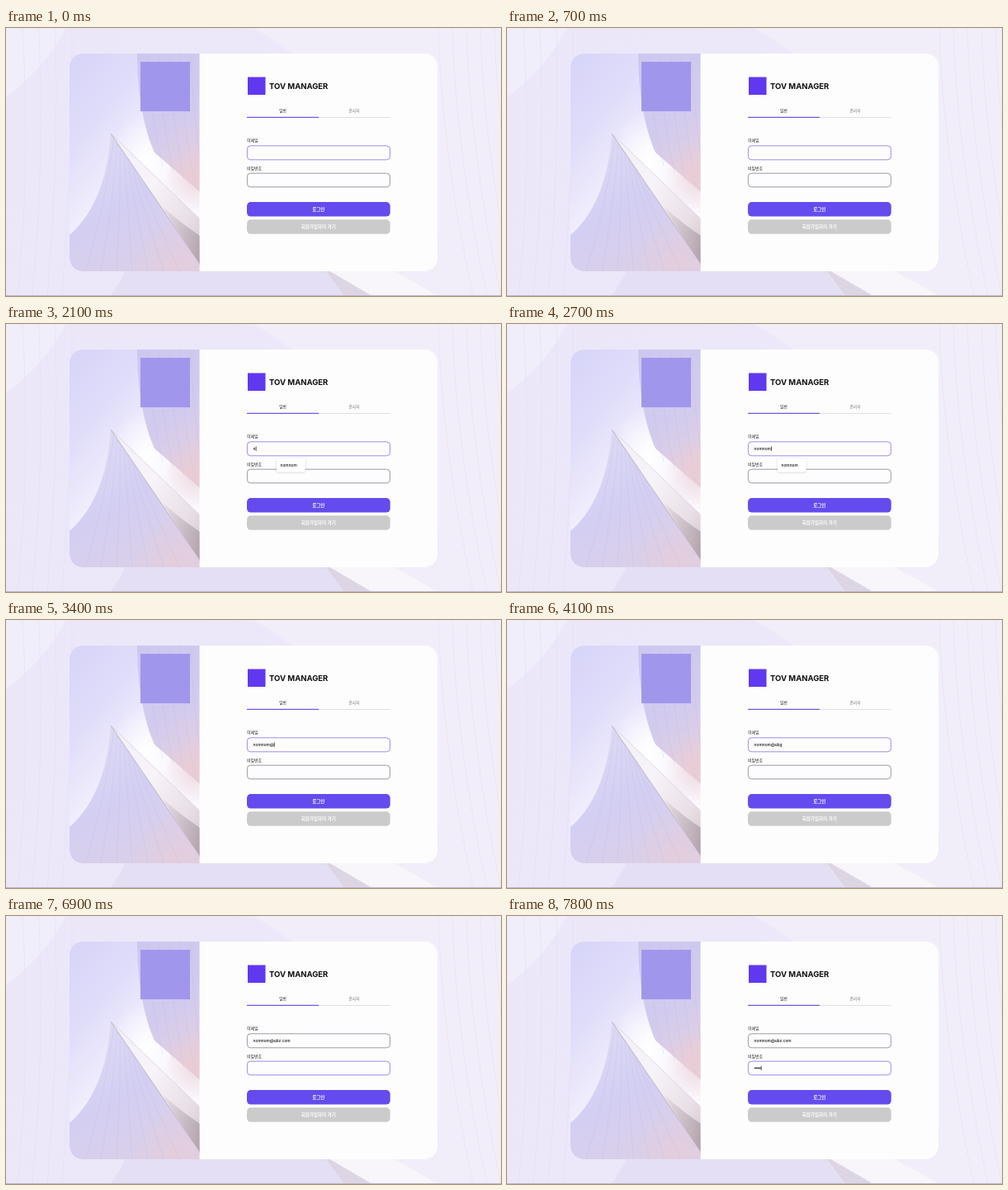
Recreate the animation shown at these times as an HTML page. Size 600 px wide and 325 px high, loop 8000 ms.

```html
<!DOCTYPE html>
<html lang="ko">
<head>
<meta charset="utf-8">
<title>로그인</title>
<style>
html, body { margin: 0; width: 100%; height: 100%; overflow: hidden; background: #efebf9; }
svg { display: block; width: 100vw; height: 100vh; }
text { font-family: Inter, "Noto Sans CJK KR", "Noto Sans CJK", sans-serif; fill: #222; }
.ko { font-family: "Noto Sans CJK KR", "Noto Sans CJK", sans-serif; font-size: 4.9px; }
.mid { text-anchor: middle; }
.btn { font-size: 5.5px; font-weight: 700; fill: #fff; }
.typed { font-size: 4.85px; font-weight: 500; fill: #111; }
.field { fill: #fdfdfe; stroke: #85818f; stroke-width: .8; }
.field.focus { stroke: #8270ea; }
.rib { fill: none; stroke-width: .5; }
</style>
</head>
<body>
<svg viewBox="0 0 600 325" preserveAspectRatio="none">
  <defs>
    <linearGradient id="page" x2="1" y2=".3">
      <stop offset="0" stop-color="#ebe7f9"/><stop offset=".5" stop-color="#ece8fa"/><stop offset="1" stop-color="#f1edf9"/>
    </linearGradient>
    <linearGradient id="sky" x2=".7" y2="1">
      <stop offset="0" stop-color="#d6d4f8"/><stop offset=".3" stop-color="#e0ddfa"/><stop offset=".6" stop-color="#f3f0fd"/><stop offset="1" stop-color="#fbf8fd"/>
    </linearGradient>
    <linearGradient id="wall" x2=".3" y2="1">
      <stop offset="0" stop-color="#cbc8f0"/><stop offset=".6" stop-color="#d2cbee"/><stop offset="1" stop-color="#e3cfdf"/>
    </linearGradient>
    <linearGradient id="sail" x1=".2" x2=".7" y2="1">
      <stop offset="0" stop-color="#dedbf5"/><stop offset=".5" stop-color="#d3cff3"/><stop offset="1" stop-color="#dccfe6"/>
    </linearGradient>
    <linearGradient id="ridge" x2="1" y2=".9">
      <stop offset="0" stop-color="#f2eff9"/><stop offset=".45" stop-color="#f7f3f8"/><stop offset=".8" stop-color="#e9dfe6"/><stop offset="1" stop-color="#d5c9d2"/>
    </linearGradient>
    <linearGradient id="shade" x2="1" y2="1">
      <stop offset="0" stop-color="#c9bfca" stop-opacity=".3"/><stop offset="1" stop-color="#a2969f"/>
    </linearGradient>
    <radialGradient id="glow">
      <stop offset="0" stop-color="#fff"/><stop offset="1" stop-color="#fff" stop-opacity="0"/>
    </radialGradient>
    <radialGradient id="blush">
      <stop offset="0" stop-color="#eccbd0" stop-opacity=".75"/><stop offset="1" stop-color="#eccbd0" stop-opacity="0"/>
    </radialGradient>
    <clipPath id="card"><rect x="77" y="31" width="446" height="264" rx="16"/></clipPath>
    <clipPath id="panel"><rect x="77" y="31" width="157.5" height="264"/></clipPath>
    <filter id="soft" x="-20%" y="-30%" width="140%" height="180%">
      <feDropShadow dx="0" dy=".6" stdDeviation="1" flood-color="#556" flood-opacity=".3"/>
    </filter>
  </defs>

  <rect width="600" height="325" fill="url(#page)"/>
  <path d="M0 0H72C58 30 30 62 0 84Z" fill="#f1eefb"/>
  <path d="M300 0H600V325H540C530 220 450 90 300 0Z" fill="#f2eef9"/>
  <g id="pageRibs" stroke="#e2d9ee"></g>
  <path d="M146 290Q140 308 126 325H410L384 290Z" fill="#e4dff5"/>
  <path d="M384 290L410 325H524L462 290Z" fill="#f8f5fb"/>
  <path d="M384 290L410 325H444Z" fill="#ddd5e4"/>
  <path d="M0 324.5H600" stroke="#bdb8c6"/>

  <g clip-path="url(#card)">
    <rect x="77" y="31" width="446" height="264" fill="#fdfdfe"/>
    <g clip-path="url(#panel)">
      <rect x="77" y="31" width="158" height="264" fill="url(#sky)"/>
      <ellipse cx="172" cy="160" rx="50" ry="60" fill="url(#glow)"/>
      <path d="M159 31C159 78 167 122 180 151Q203 171 235 199V31Z" fill="url(#wall)"/>
      <g id="wallRibs" stroke="#bdb3e2" stroke-opacity=".55"></g>
      <circle cx="234" cy="180" r="42" fill="url(#blush)"/>
      <path d="M127 128L235 232V290Z" fill="url(#ridge)"/>
      <path d="M190 217Q214 238 235 252V287Z" fill="url(#shade)"/>
      <path d="M127 128C124 178 108 225 77 251V295H235V286Z" fill="url(#sail)"/>
      <circle cx="205" cy="285" r="48" fill="url(#blush)" opacity=".6"/>
      <g id="sailRibs" stroke="#bcb2dc" stroke-opacity=".5"></g>
      <path d="M127 128L235 286" stroke="#b5a9b8" stroke-width=".8"/>
      <path d="M127 128L235 232" stroke="#cfc5d4" stroke-width=".6"/>
    </g>
  </g>
  <rect x="163" y="41" width="60" height="60" fill="#a096ec"/>

  <rect x="293" y="59.500" width="21.500" height="21.500" fill="#6038f0"/>
  <text x="319" y="73.700" font-size="9.500" font-weight="700" style="fill:#111">TOV MANAGER</text>

  <text class="ko mid" x="335.500" y="102" font-weight="500">일반</text>
  <text class="ko mid" x="422" y="102" style="fill:#777">관리자</text>
  <path d="M378 108.500H465.700" stroke="#dcdae2" stroke-width=".8"/>
  <path d="M292 108.300H379" stroke="#6f58ec" stroke-width="1.200"/>

  <text class="ko" x="292" y="138.300">이메일</text>
  <rect id="mailBox" class="field" x="292.400" y="142.800" width="173" height="17" rx="4"/>
  <text id="mail" class="typed" x="299.600" y="153"></text>

  <text class="ko" x="292" y="171.500">비밀번호</text>
  <rect id="passBox" class="field" x="292.400" y="176.200" width="173" height="16.600" rx="4"/>
  <g id="dots" fill="#111"></g>

  <rect id="caret" width=".7" height="5.600" fill="#111"/>

  <g id="hint">
    <rect x="328" y="163" width="34.500" height="16.500" rx="1.800" fill="#fff" filter="url(#soft)"/>
    <text class="typed" x="332.500" y="173">nomnom</text>
  </g>

  <rect x="292" y="211" width="173.700" height="17.600" rx="4.800" fill="#644bee"/>
  <text class="ko mid btn" x="378.800" y="221.900">로그인</text>
  <rect x="292" y="232.300" width="173.700" height="17.500" rx="4.800" fill="#cbcbcb"/>
  <text class="ko mid btn" x="378.800" y="243">회원가입하러 가기</text>
</svg>
<script>
const $ = id => document.getElementById(id);
const NS = "http://www.w3.org/2000/svg";

function add(parent, tag, attrs) {
  const el = document.createElementNS(NS, tag);
  for (const k in attrs) el.setAttribute(k, attrs[k]);
  return $(parent).appendChild(el);
}
const rib = (parent, d) => add(parent, "path", { class: "rib", d });

for (let i = 1; i < 8; i++) {
  const x = 77 + i * 19;
  rib("sailRibs", `M${127 + i * 4} ${128 + i * 6}Q${(127 + x) / 2 + 8} 220 ${x} 295`);
}
for (let i = 1; i < 6; i++) {
  const x = 159 + i * 13;
  rib("wallRibs", `M${x} 31Q${x + 1} 100 ${x + 18} ${160 + i * 8}`);
}
for (let i = 0; i < 5; i++) {
  const x = 524 + i * 17;
  rib("pageRibs", `M${x} 0Q${x + 4} 150 ${x + 42} 325`);
}
for (let i = 0; i < 4; i++) {
  rib("pageRibs", `M${14 + i * 18} 325Q${30 + i * 17} 170 ${20 + i * 20} 0`);
}
const dots = [0, 1, 2, 3].map(i => add("dots", "circle", { cx: 300.8 + i * 2, cy: 184.4, r: .85 }));

// [start ms, text]
const mailKeys = [
  [0, ""], [1200, "N"], [1400, "NO"], [1600, "NOM"], [1800, "NO"], [1900, "N"], [2000, ""],
  [2100, "n"], [2200, "no"], [2400, "nom"], [2500, "nomn"], [2600, "nomno"], [2700, "nomnom"],
  [3100, "nomnom@"], [3500, "nomnom@u"], [3600, "nomnom@ub"], [3800, "nomnom@ubg"],
  [4400, "nomnom@ub"], [4700, "nomnom@ubz"], [5700, "nomnom@ubz."], [5800, "nomnom@ubz.c"],
  [5900, "nomnom@ubz.co"], [6100, "nomnom@ubz.com"]
];
const passKeys = [[0, 0], [7400, 1], [7500, 2], [7600, 3], [7800, 4]];
const caretKeys = [
  [0, 0], [300, 1], [700, 0], [1200, 1], [2900, 0], [3100, 1], [4100, 0], [4400, 1],
  [5000, 0], [5400, 1], [6700, 0], [7200, 1]
];
const hintKeys = [[0, 0], [1200, 1], [2000, 0], [2100, 1], [3100, 0]];

function at(keys, t) {
  let v = keys[0][1];
  for (const [start, value] of keys) if (t >= start) v = value;
  return v;
}
const show = (el, on) => { el.style.visibility = on ? "visible" : "hidden"; };

function draw(now) {
  const t = now % 8000;
  const onPass = t >= 6400;
  const text = at(mailKeys, t), count = at(passKeys, t);

  if ($("mail").textContent !== text) $("mail").textContent = text;
  dots.forEach((dot, i) => show(dot, i < count));
  $("mailBox").classList.toggle("focus", !onPass);
  $("passBox").classList.toggle("focus", onPass);
  show($("hint"), at(hintKeys, t));

  const width = onPass ? count * 2 : text ? $("mail").getComputedTextLength() : 0;
  $("caret").setAttribute("x", 299.8 + width);
  $("caret").setAttribute("y", onPass ? 181.6 : 148.4);
  show($("caret"), at(caretKeys, t));
  requestAnimationFrame(draw);
}
draw(performance.now());
</script>
</body>
</html>
```
